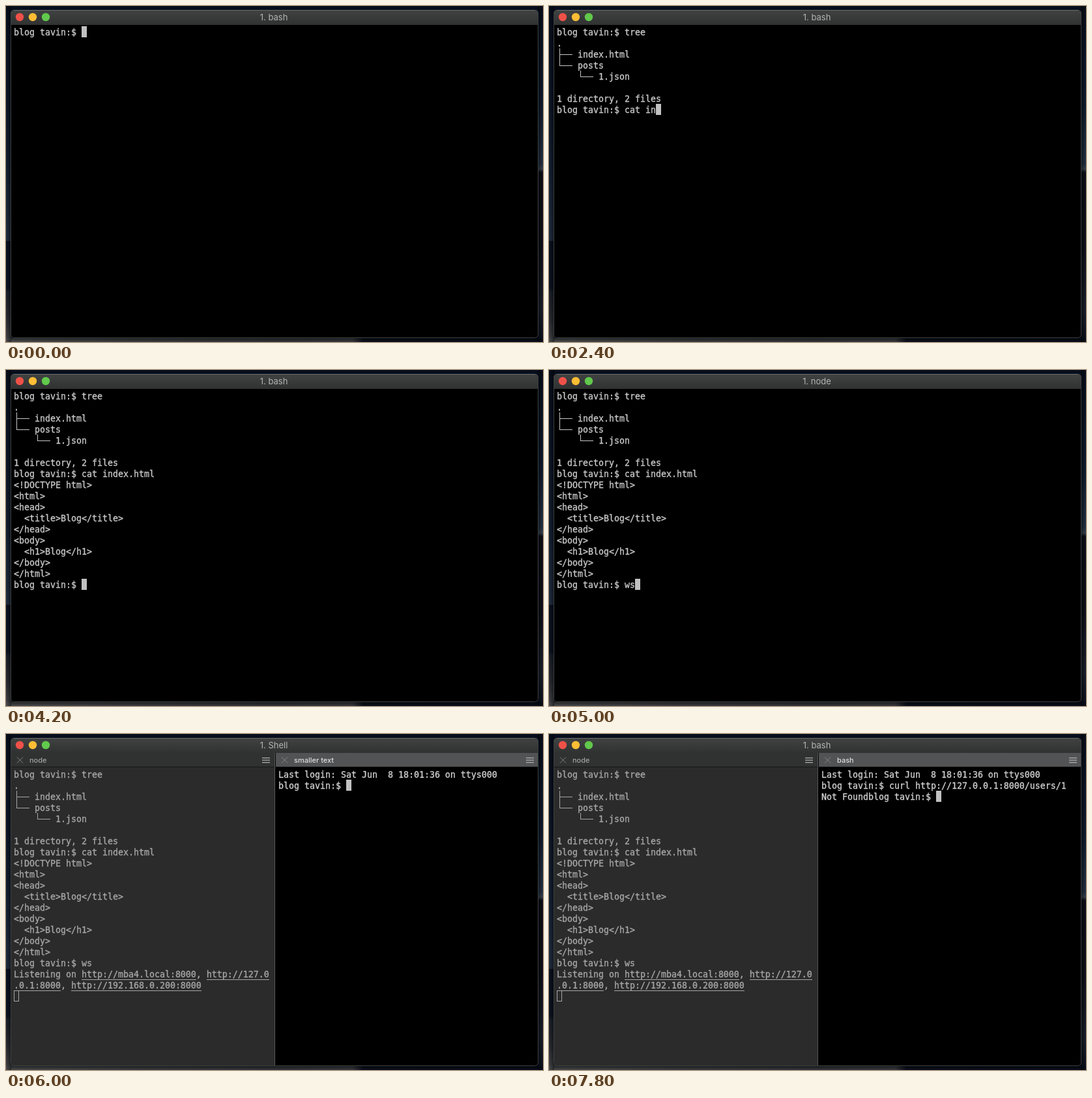
An HTML page with a canvas that plays this animation: 824 by 515 pixels, repeating every 8 s.

```html
<!DOCTYPE html>
<html lang="en">
<head>
<meta charset="utf-8">
<title>Terminal</title>
<style>
html, body { margin: 0; width: 100%; height: 100%; overflow: hidden; background: #0a1222; }
canvas { display: block; }
</style>
</head>
<body>
<canvas id="stage" width="824" height="515"></canvas>
<script>
const ctx = document.getElementById('stage').getContext('2d');
const LOOP = 8000, TICK = 200;
const CELL = 8, ROW = 17;
const MONO = '13.29px "DejaVu Sans Mono", monospace';
const PROMPT = 'blog tavin:$ ';

const TREE = ['.', '├── index.html', '└── posts', '    └── 1.json', '', '1 directory, 2 files'];
const PAGE = ['<!DOCTYPE html>', '<html>', '<head>', '  <title>Blog</title>', '</head>',
  '<body>', '  <h1>Blog</h1>', '</body>', '</html>'];
const LISTEN = 'Listening on http://mba4.local:8000, http://127.0.0.1:8000, http://192.168.0.200:8000';
const LOGIN = 'Last login: Sat Jun  8 18:01:36 on ttys000';
const CURL = 'curl http://127.0.0.1:8000/users/1';

function typed(text, t, start, end) {
  const p = Math.min(1, Math.max(0, (t - start) / (end - start)));
  return text.slice(0, Math.round(text.length * p));
}

function mainLines(t) {
  const out = [PROMPT + typed('tree', t, 0, 400)];
  if (t < 600) return out;
  out.push(...TREE, PROMPT + (t < 2600 ? typed('cat in', t, 1800, 2400) : 'cat index.html'));
  if (t < 3000) return out;
  out.push(...PAGE, PROMPT + typed('ws', t, 4400, 4800));
  if (t >= 5200) out.push(LISTEN, '');
  return out;
}

function sideLines(t) {
  const out = [LOGIN, PROMPT + typed(CURL, t, 6200, 7000)];
  if (t >= 7200) out.push('Not Found' + PROMPT);
  return out;
}

function rect(x, y, w, h, fill) {
  ctx.fillStyle = fill;
  ctx.fillRect(x, y, w, h);
}

function fade(x0, y0, x1, y1, stops) {
  const g = ctx.createLinearGradient(x0, y0, x1, y1);
  stops.forEach(([at, color]) => g.addColorStop(at, color));
  return g;
}

function label(text, x, y, font, color, align = 'left') {
  ctx.font = font;
  ctx.textAlign = align;
  ctx.fillStyle = color;
  ctx.fillText(text, x, y);
}

// Box-drawing branch, joined across rows
function branch(x, y, through) {
  ctx.fillRect(x + 4, y, 1, through ? ROW : 9);
  ctx.fillRect(x + 4, y + 9, 20, 1);
}

function drawRow(text, x, y, color) {
  ctx.fillStyle = color;
  const at = text.search(/[├└]/);
  if (at >= 0) branch(x + at * CELL, y, text[at] === '├');
  ctx.font = MONO;
  ctx.textAlign = 'left';
  ctx.strokeStyle = color;
  ctx.lineWidth = 0.35;
  const plain = text.replace(/[├└─]/g, ' ');
  ctx.fillText(plain, x, y + 14);
  ctx.strokeText(plain, x, y + 14);
}

function underlines(line, cols, x, y) {
  for (const link of line.matchAll(/http:[^\s,]+/g)) {
    for (let i = link.index; i < link.index + link[0].length; i++) {
      ctx.fillRect(x + (i % cols) * CELL, y + (Math.floor(i / cols) + 1) * ROW, CELL, 1);
    }
  }
}

function terminal(lines, x, y, cols, color, active) {
  let end = 0;
  for (const line of lines) {
    const top = y;
    for (let i = 0; i === 0 || i < line.length; i += cols) {
      const part = line.slice(i, i + cols);
      drawRow(part, x, y, color);
      end = part.length;
      y += ROW;
    }
    if (line === LISTEN) underlines(line, cols, x, top);
  }
  const cx = x + end * CELL, cy = y - ROW;
  if (active) {
    rect(cx, cy, CELL, ROW, '#c1c1c1');
  } else {
    ctx.strokeStyle = color;
    ctx.lineWidth = 1;
    ctx.strokeRect(cx + 0.5, cy + 0.5, CELL - 1, ROW - 1);
  }
}

function desktop() {
  rect(0, 0, 824, 515, '#070e1c');
  rect(0, 0, 8, 515, fade(0, 0, 0, 515, [
    [0, '#070e1c'], [0.3, '#0d1829'], [0.5, '#152235'], [0.698, '#212f42'],
    [0.7, '#0a1220'], [0.84, '#0c1422'], [0.85, '#1b202b'], [0.93, '#2a2d34'], [1, '#46474a']]));
  rect(816, 0, 8, 515, fade(0, 0, 0, 515, [
    [0, '#070e1c'], [0.3, '#101c2e'], [0.47, '#243244'], [0.485, '#3a444f'], [0.495, '#0d0e16'],
    [0.72, '#10111a'], [0.9, '#1a202c'], [1, '#0a101c']]));
  rect(0, 509, 824, 6, fade(0, 0, 824, 0, [
    [0, '#4a4b4d'], [0.25, '#3c3d40'], [0.5, '#33353a'], [0.645, '#383a3f'],
    [0.665, '#0a101c'], [1, '#080e1a']]));
  const clear = 'rgba(0,0,0,0)', shade = 'rgba(0,0,0,0.5)';
  rect(0, 0, 8, 515, fade(0, 0, 8, 0, [[0, clear], [1, shade]]));
  rect(816, 0, 8, 515, fade(824, 0, 816, 0, [[0, clear], [1, shade]]));
  rect(8, 509, 808, 6, fade(0, 515, 0, 509, [[0, clear], [1, shade]]));
}

function windowFrame(title) {
  ctx.save();
  ctx.beginPath();
  ctx.roundRect(7, 6, 810, 503, 5);
  ctx.fillStyle = '#000';
  ctx.fill();
  ctx.clip();
  rect(7, 6, 811, 23, fade(0, 6, 0, 29, [[0, '#414343'], [1, '#303232']]));
  ctx.restore();
  ['#ee5148', '#fdbd35', '#61c94b'].forEach((color, i) => {
    ctx.fillStyle = color;
    ctx.beginPath();
    ctx.arc(21 + i * 20, 17, 6.2, 0, Math.PI * 2);
    ctx.fill();
  });
  label(title, 411, 22, '13px Inter, sans-serif', '#b4b5b5', 'center');
}

function border() {
  ctx.strokeStyle = '#3e4040';
  ctx.lineWidth = 1;
  ctx.beginPath();
  ctx.roundRect(7.5, 6.5, 809, 502, 5);
  ctx.stroke();
  rect(12, 6, 800, 1, '#6a6c6c');
}

function paneHeader(x, w, text, bg, color, mark) {
  rect(x, 29, w, 21, bg);
  ctx.strokeStyle = mark;
  ctx.lineWidth = 1;
  ctx.beginPath();
  ctx.moveTo(x + 9, 35.5);
  ctx.lineTo(x + 18, 44.5);
  ctx.moveTo(x + 18, 35.5);
  ctx.lineTo(x + 9, 44.5);
  ctx.stroke();
  label(text, x + 28, 44, '500 11px Inter, sans-serif', color);
  for (let i = 0; i < 3; i++) rect(x + w - 19, 36 + i * 3.5, 12, 1.3, '#aaa');
}

function draw(t) {
  desktop();
  if (t < 6000) {
    windowFrame(t < 5000 ? '1. bash' : '1. node');
    terminal(mainLines(t), 12, 31, 100, '#c7c7c7', true);
  } else {
    const fresh = t < 6200;
    windowFrame(fresh ? '1. Shell' : '1. bash');
    rect(8, 50, 404, 459, '#2b2b2b');
    paneHeader(8, 404, 'node', '#303131', '#a2a2a2', '#808080');
    paneHeader(414, 403, fresh ? 'smaller text' : 'bash', '#525354', '#dedede', '#858585');
    rect(8, 50, 809, 1, '#171717');
    rect(412, 29, 1, 480, '#565656');
    terminal(mainLines(t), 12, 53, 49, '#a5a5a5', false);
    terminal(sideLines(t), 418, 53, 49, '#cecece', true);
  }
  border();
}

const start = performance.now();
function frame() {
  const t = (performance.now() - start) % LOOP;
  draw(Math.floor(t / TICK) * TICK);
  requestAnimationFrame(frame);
}
frame();
</script>
</body>
</html>
```
